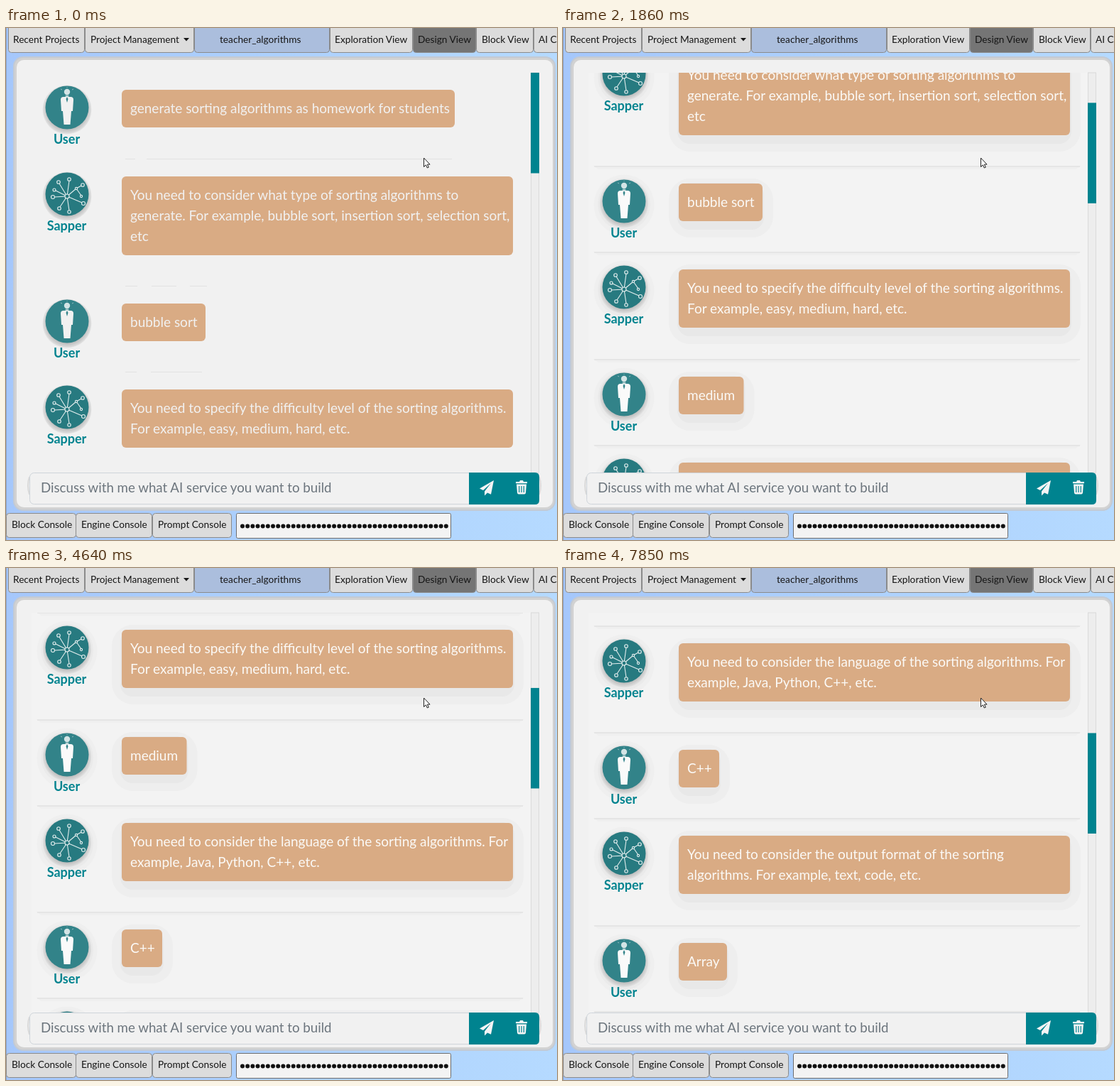
An HTML page that plays this animation: 776 by 721 pixels, repeating every 8000 ms.

```html
<!DOCTYPE html>
<html lang="en">
<head>
<meta charset="utf-8">
<title>Chat scroll</title>
<style>
  html, body { margin: 0; width: 100%; height: 100%; overflow: hidden; }
  svg { display: block; }
  text { font-family: Lato, "Noto Sans", sans-serif; white-space: pre; }
  .tab { font-size: 13.7px; fill: #161616; }
  .message { font-size: 19px; fill: #fbf9f6; }
  .role { font-size: 18px; font-weight: 700; fill: #00838f; text-anchor: middle; }
  .ink { fill: #fafafa; }
  .net { fill: none; stroke: #e4eeee; stroke-width: 1.1; }
  .dashes { display: none; stroke: #e2e2e2; }
  .flat .soft { display: none; }
  .flat .dashes { display: inline; }
  .flat .message, .flat .ink { fill: #f1f1f1; }
</style>
</head>
<body>
<svg id="stage" width="776" height="721" viewBox="0 0 776 721">
  <defs>
    <linearGradient id="sky">
      <stop offset="0" stop-color="#a5c7fb"/>
      <stop offset="1" stop-color="#b5daff"/>
    </linearGradient>
    <radialGradient id="shade">
      <stop offset=".8" stop-color="#bdbdbd"/>
      <stop offset=".95" stop-color="#d9d9d9"/>
      <stop offset="1" stop-color="#e6e6e6"/>
    </radialGradient>
    <clipPath id="view"><rect x="34" y="63" width="705" height="563"/></clipPath>
    <g id="person">
      <circle r="30.5" fill="#328389"/>
      <circle cy="-22" r="4.2" fill="#d3e4e5"/>
      <path d="M-2-17h4v3h-4zM-7-25l-2-1M7-25l2-1M0-28v-1" fill="#d3e4e5" stroke="#8fbabd"/>
      <path class="ink" d="M-9-11q0-4 4-4h10q4 0 4 4L8 5H6L4.500 24h-9L-6 5h-2z"/>
      <path d="M0-15l-1.500 3 1.500 5 1.500-5z" fill="#328389"/>
    </g>
    <g id="network">
      <circle r="30.5" fill="#277a80"/>
      <path class="net" d="M0 3L-11-15M0 3L3-19M0 3L13-8L20-12M0 3L-18 4M0 3L-10 18M0 3L3 23M0 3L21 12M0 3L-16-5M13-8L20 2"/>
      <g id="nodes" class="net"></g>
    </g>
  </defs>

  <rect width="776" height="721" fill="url(#sky)"/>
  <path d="M.5 0V721" stroke="#8aa4cc"/>
  <g id="tabs"></g>
  <path d="M250 14h8l-4 4.500z" fill="#161616"/>

  <rect x="10" y="40" width="764" height="640" rx="14" fill="#c3cad4"/>
  <rect x="12" y="42" width="760" height="636" rx="12" fill="#d2d2d2"/>
  <rect x="15" y="45" width="755" height="630" rx="10" fill="#f1f1f1"/>

  <g clip-path="url(#view)">
    <rect class="soft" x="36" y="63" width="703" height="563" fill="#f3f3f3"/>
    <g id="chat"></g>
  </g>

  <rect x="739.5" y="63" width="11" height="563" fill="#ededed" stroke="#dadada"/>
  <rect id="thumb" x="739" width="12" height="141.5" fill="#00838f"/>

  <path d="M33 632q-4 12 0 25M751 632q4 12 0 25" fill="none" stroke="#d9d9d9" stroke-width="2"/>
  <rect x="33.5" y="626.5" width="717" height="44" rx="6" fill="#f1f1f1" stroke="#ced4da"/>
  <text x="49" y="654" font-size="18.700" fill="#6c757d">Discuss with me what AI service you want to build</text>
  <path d="M652 626h93q6 0 6 6v33q0 6-6 6h-93z" fill="#00838f"/>
  <path d="M687 637L667 648.500l5 2.500 11-10-9 11.500v6l4-4 5 2.200z" fill="#f4f4f4"/>
  <path d="M718 639h5l1-2h4l1 2h5v2.300h-16zM719 642.500h14l-1 12q-.2 2-2 2h-8q-1.800 0-2-2z" fill="#f4f4f4"/>
  <path d="M722.700 645v9M726 645v9M729.300 645v9" stroke="#00838f" stroke-width="1.200"/>

  <g id="consoles"></g>
  <rect x="324.500" y="683.500" width="302" height="35" rx="2" fill="#f3f3f3" stroke="#6d6d6d"/>
  <path d="M333 701.500H620.500" stroke="#111" stroke-width="6" stroke-linecap="round" stroke-dasharray="0 7.170"/>

  <path id="arrow" d="M588.500 183v12.500l2.900-2.700 1.900 4.200 2-.9-1.900-4h3.700z" fill="#fff" stroke="#222"/>
  <path id="beam" d="M586 177.500h2M589 177.500h2M588.500 178v11M586 189.500h2M589 189.500h2" stroke="#222" fill="none"/>
</svg>
<script>
const $ = id => document.getElementById(id);
const LOOP = 8000, NOTCH = 84.4, LINE = 29;

// Wheel position in notches, held from each time on.
const scrollSteps = [
  [0, 0], [500, .717], [650, 1], [1340, 1.7], [1480, 2],
  [2510, 2.4], [2630, 2.985], [2770, 3], [3450, 3.92], [3580, 4],
  [4100, 4.15], [4220, 4.8], [4340, 5], [5430, 5.7], [5580, 6],
  [6540, 6.6], [6660, 7], [7730, 7.6], [7850, 8]
];
// Spans in which the pointer rests on text.
const beamSpans = [[960, 1860], [3830, 4640]];

const user = (width, text) => ({ role: 'User', icon: 'person', width, lines: [text] });
const bot = (...lines) => ({ role: 'Sapper', icon: 'network', width: 551, lines });
const messages = [
  user(469, 'generate sorting algorithms as homework for students'),
  bot('You need to consider what type of sorting algorithms to',
      'generate. For example, bubble sort, insertion sort, selection sort,', 'etc'),
  user(118, 'bubble sort'),
  bot('You need to specify the difficulty level of the sorting algorithms.',
      'For example, easy, medium, hard, etc.'),
  user(91.5, 'medium'),
  bot('You need to consider the language of the sorting algorithms. For',
      'example, Java, Python, C++, etc.'),
  user(57, 'C++'),
  bot('You need to consider the output format of the sorting',
      'algorithms. For example, text, code, etc.'),
  user(68, 'Array'),
  bot('', '')
];
const dashes = ['', 'M168 .5h14M198 .5h430', 'M168 .5h17M205 .5h35M259 .5h24', 'M168 .5h16M204 .5h72'];

const box = (x, y, w, h, r, fill, extra = '') =>
  `<rect x="${x}" y="${y}" width="${w}" height="${h}" rx="${r}" fill="${fill}" ${extra}/>`;

function messageRow({ role, icon, width, lines }, top, index) {
  const height = 24 + LINE * lines.length;
  return `<g transform="translate(0 ${top})">
    <path class="dashes" transform="translate(0 -25)" d="${dashes[index] || 'M0 0'}"/>
    ${index ? `<g class="soft">
      <path d="M42-25H730L722-20H50z" fill="#efefef"/>
      <path d="M44-24H728" stroke="#e5e5e5" stroke-width="2"/></g>` : ''}
    <g class="soft">
      <circle cx="86" cy="30" r="42.5" fill="#efefef"/>
      <circle cx="86" cy="29" r="37" fill="#eaeaea"/>
      ${box(149, -7, width + 29, height + 30, 30, '#eeeeee')}
      ${box(161, -1, width + 4, height + 13, 17, '#e8e8e8')}
    </g>
    <circle cx="86" cy="28" r="34.5" fill="url(#shade)"/>
    <use href="#${icon}" x="86" y="25"/>
    <text class="role" x="85.500" y="76">${role}</text>
    ${box(163, 0, width, height, 6, '#d9ab84')}
    ${lines.map((line, i) => `<text class="message" x="175" y="${33 + i * LINE}">${line}</text>`).join('')}
  </g>`;
}

let top_ = 87.3;
$('chat').innerHTML = messages.map((message, i) => {
  const row = messageRow(message, Math.round(top_), i);
  top_ += 92.3 + LINE * message.lines.length;
  return row;
}).join('');

$('nodes').innerHTML = [
  [0, 3, 3], [-12, -17, 2.3], [3, -21, 2.3], [22, -13, 2.3], [-20, 4, 2.5],
  [-11, 20, 2.3], [3, 25, 2.2], [23, 13, 2.5], [-18, -6, 2], [13, -8, 1.6], [20, 3, 1.6]
].map(([x, y, r]) => `<circle cx="${x}" cy="${y}" r="${r}" fill="#277a80"/>`).join('');

const button = (y, h, baseline) => ([x, right, textX, label, fill = '#dcdcdc', color = '#161616']) =>
  box(x + .5, y + .5, right - x - 1, h, 4, fill, 'stroke="#8b8b8b"') +
  `<text class="tab" x="${textX}" y="${baseline}" style="fill:${color}">${label}</text>`;

$('tabs').innerHTML = [
  [3, 111, 10, 'Recent Projects'],
  [111, 265, 119, 'Project Management'],
  [265, 456, 301, 'teacher_algorithms', '#abbedd'],
  [456, 573, 463, 'Exploration View'],
  [573, 662, 580, 'Design View', '#757575'],
  [662, 743, 670, 'Block View'],
  [743, 830, 750, 'AI Chain']
].map(button(-6, 40, 21)).join('');

$('consoles').innerHTML = [
  [0, 99, 8, 'Block Console'],
  [98, 206, 106, 'Engine Console'],
  [206, 318, 214, 'Prompt Console']
].map(button(683, 34, 704)).join('');

function draw(now) {
  const t = now % LOOP;
  const scroll = NOTCH * scrollSteps.findLast(([start]) => start <= t)[1];
  const onText = beamSpans.some(([from, to]) => t >= from && t < to);
  $('stage').classList.toggle('flat', t < 500);
  $('chat').setAttribute('transform', `translate(0 ${-Math.round(scroll)})`);
  $('thumb').setAttribute('y', 63 + scroll * .251);
  $('arrow').style.display = onText ? 'none' : '';
  $('beam').style.display = onText ? '' : 'none';
}

const start = performance.now();
function tick() {
  draw(performance.now() - start);
  requestAnimationFrame(tick);
}
tick();
</script>
</body>
</html>
```
